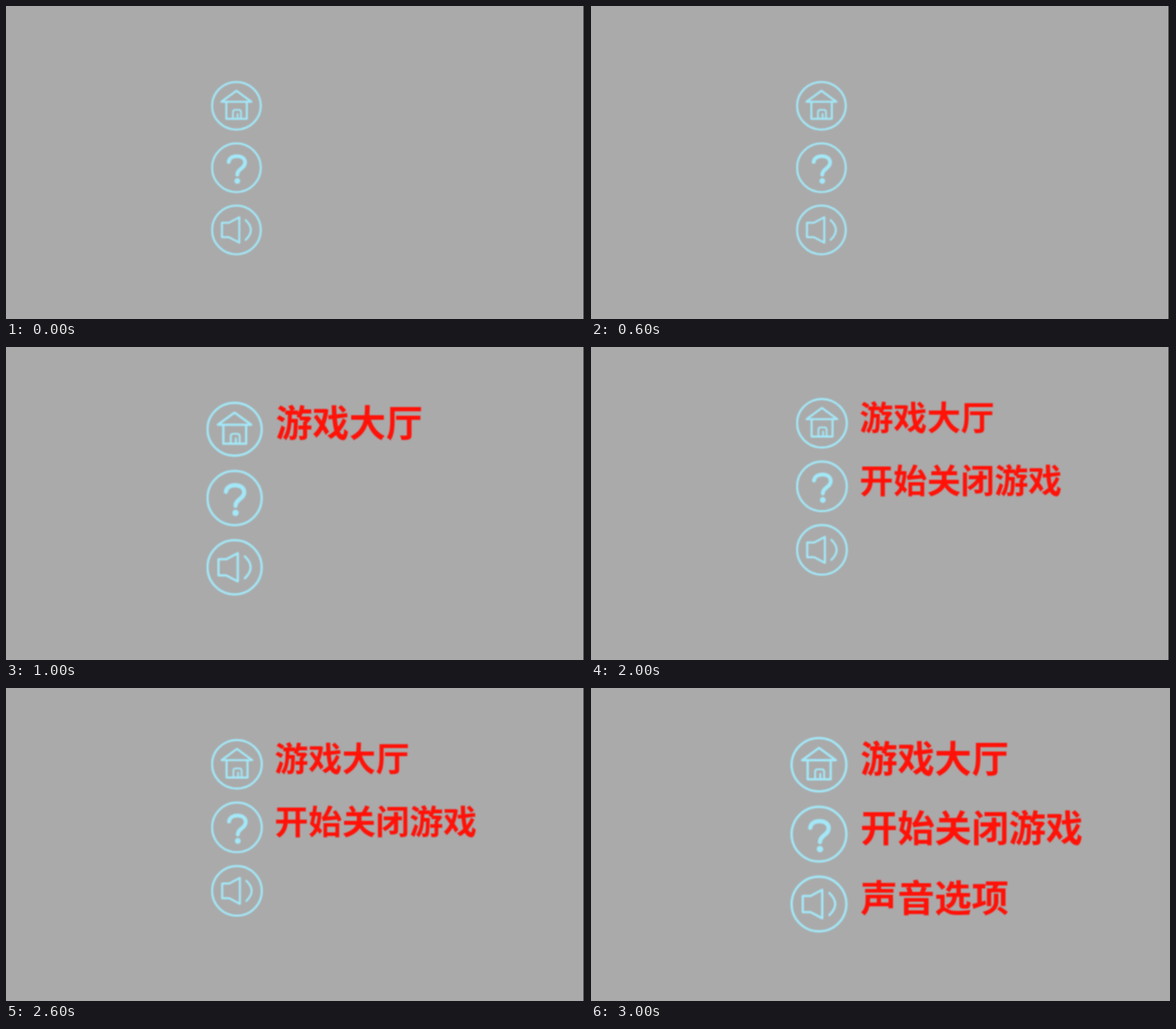
An HTML page without scripts for the animation above (4 s loop, 1002 px wide and 542 px high).

```html
<!DOCTYPE html>
<html lang="zh-CN">
<head>
<meta charset="utf-8">
<title>Menu</title>
<style>
html, body { margin: 0; width: 100%; height: 100%; overflow: hidden; background: #aaa; }
svg { display: block; width: 100%; height: 100%; }
.soft { filter: blur(0.8px); }
.menu, .label, .edge { animation: 4s step-end infinite; }

/* The menu jumps between four layouts, one per second */
.menu { animation-name: layout; }
@keyframes layout {
  0%   { transform: translate(398.7px, 172.8px) scale(1); }
  25%  { transform: translate(395.5px, 142.4px) scale(1.112); }
  50%  { transform: translate(399.6px, 132px) scale(1.02); }
  75%, 100% { transform: translate(394.5px, 132.8px) scale(1.122); }
}

.icon { fill: none; stroke: #a3e8f8; stroke-width: 3.6; stroke-linejoin: round; stroke-linecap: round; }
.label { fill: #ff1208; font: 700 57.2px "Noto Sans CJK SC", "Noto Sans CJK", sans-serif; }
.hall { animation-name: second; }
.toggle { animation-name: third; }
.sound { animation-name: fourth; }
.edge { fill: #1c1c1c; animation-name: edge; }
@keyframes second { 0% { opacity: 0; } 25%, 100% { opacity: 1; } }
@keyframes third  { 0% { opacity: 0; } 50%, 100% { opacity: 1; } }
@keyframes fourth { 0% { opacity: 0; } 75%, 100% { opacity: 1; } }
@keyframes edge   { 0% { opacity: 1; } 75%, 100% { opacity: 0; } }
</style>
</head>
<body>
<svg viewBox="0 0 1002 542" preserveAspectRatio="none">
  <rect width="1002" height="542" fill="#aaa"/>
  <rect class="edge" x="999.4" width="2.6" height="542"/>
  <g class="soft">
    <g class="menu">
      <g>
        <g class="icon">
          <ellipse rx="42.2" ry="41.2"/>
          <path d="M0-26 26-7H-26ZM-17.5-7V22.5H18V-7"/>
          <path d="M-6 22V11Q-6 7-2 7H4Q8 7 8 11V22M2 14V22" stroke-width="3"/>
        </g>
        <text class="label hall" x="64" y="11.5">游戏大厅</text>
      </g>
      <g transform="translate(0 107.2)">
        <g class="icon">
          <circle r="42.2"/>
          <path d="M-13.5-10C-12.5-17-6-20 1-20 9-20 15-16 15-9 15 1 1.5 2 1.5 12" stroke-width="6.6"/>
          <circle cx="1.5" cy="23" r="5" fill="#a3e8f8" stroke="none"/>
        </g>
        <text class="label toggle" x="64" y="11.5">开始关闭游戏</text>
      </g>
      <g transform="translate(0 215)">
        <g class="icon">
          <circle r="42.2"/>
          <path d="M-25-12.5H-13L5-22V22L-13 12.5H-25Z"/>
          <path d="M16-17Q34 0 16 17"/>
        </g>
        <text class="label sound" x="64" y="11.5">声音选项</text>
      </g>
    </g>
  </g>
</svg>
</body>
</html>
```
